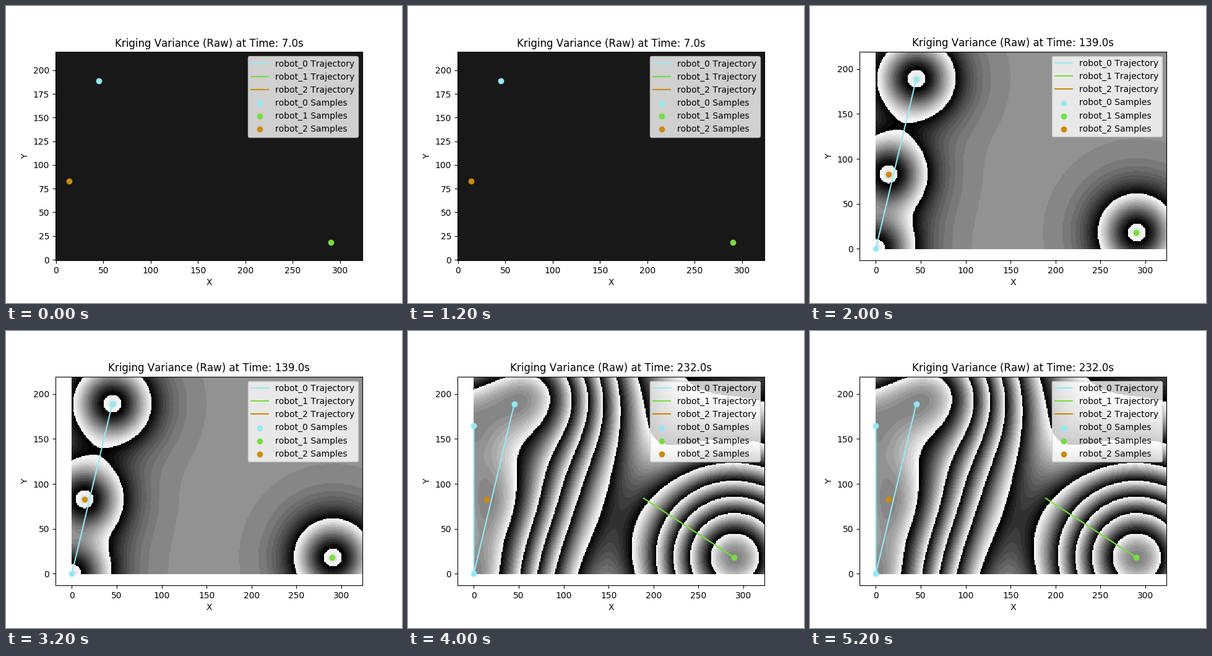
A matplotlib script that plays this animation: 640x480 px, repeating every 6000 ms.

```python
import numpy as np
import matplotlib.pyplot as plt
from matplotlib.animation import FuncAnimation

W, H = 324, 220
COLORS = ["#97e7f3", "#77dd3b", "#c98c08"]
GRAY_STEP = 12

HOME = [(45, 189), (290, 18), (14, 83)]
ORIGIN, NORTH = (0, 0), (0, 165)


def kriging_variance(samples, floor, sill, reach):
    """Ordinary kriging variance on the grid with a Gaussian covariance."""
    pts = np.array(samples, float)
    y, x = np.mgrid[0:H, 0:W]
    grid = np.column_stack([x.ravel(), y.ravel()])

    def cov(a, b):
        d2 = ((a[:, None] - b[None]) ** 2).sum(axis=2)
        return np.exp(-d2 / (2 * reach ** 2))

    k = cov(grid, pts)
    inv = np.linalg.inv(cov(pts, pts))
    weights = k @ inv
    explained = (weights * k).sum(axis=1)
    unbiased = (1 - weights.sum(axis=1)) ** 2 / inv.sum()
    return (floor + sill * (1 - explained + unbiased)).reshape(H, W)


def to_gray(variance):
    """Wrap to one byte and reduce to even gray steps."""
    level = (variance % 256) // GRAY_STEP
    return level * 255 / (255 // GRAY_STEP)


def state(time, paths, samples, field, xlim, ylim, ystep):
    return dict(time=time, paths=paths, samples=samples, image=to_gray(field),
                xlim=xlim, ylim=ylim, ystep=ystep)


a, b, c = HOME
tight = dict(xlim=(-0.5, W - 0.5), ylim=(-0.5, H - 0.5), ystep=25)
wide = dict(xlim=(-18.2, W - 0.5), ylim=(-13.1, H - 0.5), ystep=50)

STATES = [
    state(7, [[a], [b], [c]], [[a], [b], [c]],
          np.full((H, W), 24.0), **tight),
    state(139, [[a, ORIGIN], [b], [c]], [[a, ORIGIN], [b], [c]],
          kriging_variance([a, b, c, ORIGIN], 232, 339, 36.6), **wide),
    state(232, [[a, ORIGIN, NORTH], [b, (189, 84)], [c]],
          [[a, ORIGIN, NORTH], [b], [c]],
          kriging_variance([a, b, c, ORIGIN, NORTH], 133, 1330, 86.8), **wide),
]

plt.rcParams["font.family"] = "DejaVu Sans"
plt.rcParams["text.kerning_factor"] = 6
fig, ax = plt.subplots(figsize=(6.4, 4.8), dpi=100)
image = ax.imshow(STATES[0]["image"], cmap="gray", vmin=0, vmax=255,
                  origin="lower", interpolation="nearest")
lines = [ax.plot([], [], color=col, label=f"robot_{i} Trajectory")[0]
         for i, col in enumerate(COLORS)]
dots = [ax.scatter([], [], color=col, label=f"robot_{i} Samples")
        for i, col in enumerate(COLORS)]
ax.set_xlabel("X")
ax.set_ylabel("Y")
ax.legend(loc="upper right")


def update(i):
    s = STATES[i]
    image.set_data(s["image"])
    for line, path in zip(lines, s["paths"]):
        line.set_data(*zip(*path))
    for dot, pts in zip(dots, s["samples"]):
        dot.set_offsets(pts)
    ax.set_xticks(range(0, 301, 50))
    ax.set_yticks(range(0, 201, s["ystep"]))
    ax.set_xlim(s["xlim"])
    ax.set_ylim(s["ylim"])
    ax.set_title(f"Kriging Variance (Raw) at Time: {s['time']:.1f}s")
    return [image, *lines, *dots]


anim = FuncAnimation(fig, update, frames=len(STATES), interval=2000,
                     repeat=True, repeat_delay=0, blit=False)
plt.show()
```
